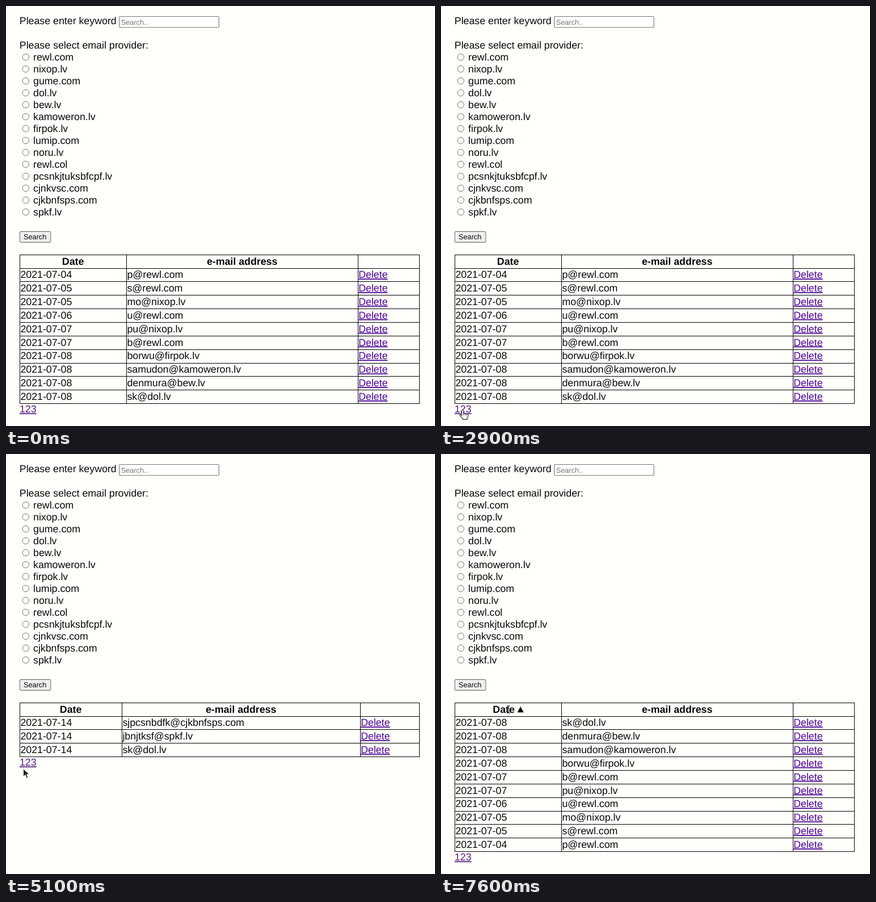
An HTML page for the animation above (8000 ms loop, 756 by 740 pixels).

```html
<!DOCTYPE html>
<html lang="en">
<head>
<meta charset="utf-8">
<title>E-mail list</title>
<style>
  html, body { margin: 0; width: 100%; height: 100%; overflow: hidden; background: #fffffb; }
  svg { display: block; width: 756px; height: 740px; }
  text { font: 17.77px "Liberation Sans", Arial, sans-serif; text-rendering: geometricPrecision; fill: #080808; }
  .small { font-size: 12.73px; }
  .bold { font-weight: bold; text-anchor: middle; }
  .link { fill: #4b0098; text-decoration: underline; }
  .page { fill: #551a80; text-decoration: underline; }
  .pressed { fill: #c41238; }
  .line { fill: #000; }
</style>
</head>
<body>
<svg viewBox="0 0 756 740">
  <g id="form"></g>
  <g id="table"></g>
  <g id="cursor">
    <path id="arrow" d="M.5 .5V14.5L3.9 11.4L6.3 17L8.7 16L6.4 10.5H11Z" fill="#222" stroke="#fff" stroke-width=".9"/>
    <path id="hand" d="M4.5 11V2Q4.5 .6 6 .6T7.5 2V7Q9 5.8 10.2 7.2Q11.8 6.2 12.8 7.8Q15.8 7 15.8 10V12.5L14.2 15V17.4H6.2V15.8L1 10.6Q.8 8.6 2.6 8.9Z M7.5 7V10M10.2 7.2V10M12.8 7.8V10.3" fill="#fff" stroke="#333" stroke-width="1.1"/>
    <path id="beam" d="M1 .8Q3.8 .8 3.8 2.5V12.5Q3.8 14.2 1 14.2M6.6 .8Q3.8 .8 3.8 2.5M3.8 12.5Q3.8 14.2 6.6 14.2" fill="none" stroke="#333" stroke-width="1.1"/>
  </g>
</svg>
<script>
const LOOP = 8000, TOP = 437.7, ROW = 23.86, LEFT = 24, RIGHT = 728;
const $ = id => document.getElementById(id);

const providers = ["rewl.com", "nixop.lv", "gume.com", "dol.lv", "bew.lv", "kamoweron.lv",
  "firpok.lv", "lumip.com", "noru.lv", "rewl.col", "pcsnkjtuksbfcpf.lv", "cjnkvsc.com",
  "cjkbnfsps.com", "spkf.lv"];

// Column lines, then rows of day and address
const pages = {
  1: { cols: [212, 620], rows: ["04 p@rewl.com", "05 s@rewl.com", "05 mo@nixop.lv", "06 u@rewl.com",
    "07 pu@nixop.lv", "07 b@rewl.com", "08 borwu@firpok.lv", "08 samudon@kamoweron.lv",
    "08 denmura@bew.lv", "08 sk@dol.lv"] },
  2: { cols: [199, 627], rows: ["08 borwu@firpok.lv", "08 mosmuli@lumip.com", "13 polibtrum@noru.lv",
    "13 ruwi@rewl.com", "13 ruwi@rewl.com", "14 ruwi@rewl.com", "14 sjbnjktjcf@pcsnkjtuksbfcpf.lv",
    "14 cpdtnfb@cjnkvsc.com", "14 sjpcsnbdfk@cjkbnfsps.com", "14 sk@dol.lv"] },
  3: { cols: [204, 624], rows: ["14 sjpcsnbdfk@cjkbnfsps.com", "14 jbnjtksf@spkf.lv", "14 sk@dol.lv"] }
};

// time, page, pressed page link, sort state
const views = [
  [0, 1, 0, ""], [1800, 1, 1, ""], [1900, 1, 0, ""], [2800, 1, 2, ""], [2900, 1, 0, ""],
  [3000, 2, 0, ""], [4000, 2, 3, ""], [4200, 3, 0, ""], [5700, 3, 1, ""], [5800, 1, 0, ""],
  [6900, 1, 0, "down"], [7600, 1, 0, "up"]
];

// time, pointer shape, left, top
const moves = [
  [0, "", 0, 0], [600, "arrow", 151, 105], [1400, "hand", 23, 704], [1500, "hand", 23, 706],
  [1600, "hand", 23, 708], [1700, "hand", 24, 709], [2000, "hand", 27, 710], [2100, "hand", 31, 711],
  [2200, "hand", 34, 711], [2400, "hand", 28, 710], [2500, "hand", 31, 711], [2800, "hand", 32, 711],
  [3200, "hand", 34, 711], [3300, "hand", 36, 712], [3400, "hand", 38, 713], [3500, "hand", 40, 714],
  [3600, "hand", 41, 714], [4100, "arrow", 45, 717], [4600, "arrow", 43, 696], [4700, "arrow", 35, 640],
  [4800, "arrow", 27, 593], [4900, "arrow", 30, 576], [5100, "arrow", 30, 554], [5200, "hand", 25, 549],
  [5300, "hand", 23, 548], [5500, "hand", 22, 549], [6100, "arrow", 29, 528], [6300, "arrow", 62, 490],
  [6400, "arrow", 95, 458], [6600, "arrow", 120, 450], [6700, "beam", 115.5, 442.5]
];

const text = (x, y, s, cls = "") => `<text x="${x}" y="${y}" class="${cls}">${s}</text>`;
const line = (x, y, w, h) => `<rect class="line" x="${x}" y="${y}" width="${w}" height="${h}"/>`;
const box = (x, y, w, h, fill, rx) =>
  `<rect x="${x}" y="${y}" width="${w}" height="${h}" rx="${rx}" fill="${fill}" stroke="#767676" stroke-width="1.1"/>`;
const last = (steps, t) => steps.findLast(s => s[0] <= t);

function drawForm() {
  const radios = providers.map((name, i) => {
    const y = 90 + 21 * i;
    return `<circle cx="34.8" cy="${y}" r="5.7" fill="#fff" stroke="#767676"/>` + text(48, y + 6, name);
  });
  $("form").innerHTML = text(23.8, 32, "Please enter keyword") +
    box(199.6, 18.5, 175.6, 19.3, "#fff", 1.5) +
    `<text class="small" x="202.7" y="32.6" style="fill:#757575">Search..</text>` +
    text(23.8, 75, "Please select email provider:") + radios.join("") +
    box(24.4, 397.4, 54.4, 19, "#efefef", 2.5) + text(31, 411.4, "Search", "small");
}

function drawTable([, page, pressed, sort]) {
  const { cols: [a, b], rows } = pages[page];
  const list = sort === "up" ? [...rows].reverse() : rows;
  const lineY = i => Math.round(TOP + i * ROW);
  const count = rows.length + 1, top = lineY(0), bottom = lineY(count);
  let out = "";
  for (let i = 0; i <= count; i++) out += line(LEFT, lineY(i), RIGHT - LEFT + 1, 1);
  for (const x of [LEFT, a, b, RIGHT]) out += line(x, top, 1, bottom - top + 1);

  out += text((LEFT + a) / 2 + .1 - (sort ? 7.5 : 0), 456, "Date", "bold") +
    text((a + b) / 2 + .1, 456, "e-mail address", "bold");
  if (sort) out += `<path d="${sort === "up" ? "M134.5 455.3H145.7L140.1 445Z" : "M134.5 445.3H145.7L140.1 455.6Z"}"/>`;

  list.forEach((row, i) => {
    const [day, mail] = row.split(" "), y = TOP + (i + 1) * ROW + 17.7;
    out += text(LEFT + 1.4, y, "2021-07-" + day) + text(a + 1.4, y, mail) + text(b + 1.2, y, "Delete", "link");
  });
  for (let n = 1; n <= 3; n++)
    out += text(23.9 + (n - 1) * 9.88, TOP + count * ROW + 16.2, n, n === pressed ? "page pressed" : "page");
  $("table").innerHTML = out;
}

function drawCursor(t) {
  let [start, shape, x, y] = last(moves, t);
  if (start === 600) {
    const p = Math.floor((t - 600) / 100) / 8, k = p * p * (3 - 2 * p);
    x += (23 - x) * k;
    y += (704 - y) * k;
  }
  for (const id of ["arrow", "hand", "beam"]) $(id).style.display = id === shape ? "" : "none";
  $("cursor").setAttribute("transform", `translate(${x} ${y})`);
}

let shown;
const origin = performance.now();
function tick() {
  const t = (performance.now() - origin) % LOOP, view = last(views, t);
  if (view !== shown) drawTable(shown = view);
  drawCursor(t);
  requestAnimationFrame(tick);
}
drawForm();
tick();
</script>
</body>
</html>
```
